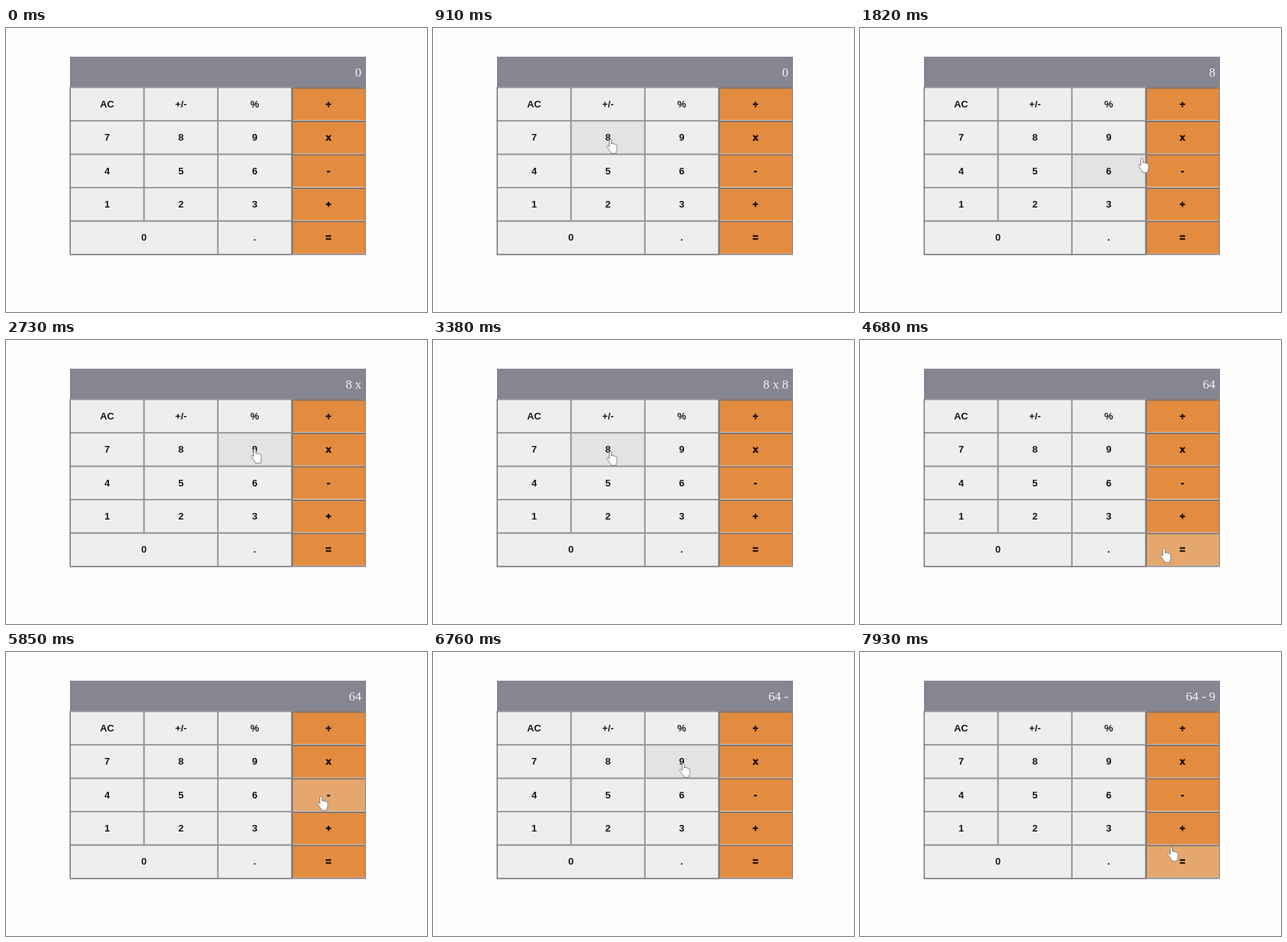
An HTML page that plays this animation: 572 by 386 pixels, repeating every 8 s.

```html
<!DOCTYPE html>
<html lang="en">
<head>
<meta charset="utf-8">
<title>Calculator</title>
<style>
html, body { margin: 0; width: 100%; height: 100%; overflow: hidden; background: #fefefe; }
svg { display: block; width: 572px; height: 386px; }
.key { font: bold 13.3px "Liberation Sans", Arial, sans-serif; text-anchor: middle; fill: #151515; }
.key.op { fill: #000; stroke: #000; stroke-width: .5px; }
#screen { font: 17.3px "Liberation Serif", Times, serif; text-anchor: end; fill: #f4f4f4; }
</style>
</head>
<body>
<svg viewBox="0 0 572 386">
  <rect x="87" y="39" width="402" height="42" fill="#868592"/>
  <text id="screen" x="483" y="66">0</text>
  <g id="faces"></g>
  <g id="edges" fill="none"></g>
  <g id="labels"></g>
  <path d="M87.5 39V308M488.5 39V308" stroke="#7d7d82"/>
  <path d="M87 307.7H489" stroke="#858585" stroke-width="1.6"/>
  <path id="hand" visibility="hidden" fill="#fff" stroke="#777" stroke-width=".9" stroke-linejoin="round"
    d="M4 2q0-1.6 1.5-1.6T7 2v5q.3-1 1.5-.9 1.2.1 1.3 1.2.4-.8 1.4-.6 1.1.2 1.1 1.4.5-.5 1.3-.2 1 .4.9 1.6V14q0 1.5-1 3v2.6H6.2V18Q4 15.5 2.5 13L.8 10.6q-.6-1.2.5-1.8 1.1-.4 2 .8L4 10.8Z"/>
</svg>
<script>
const LOOP = 8000, STEP = 130;
const LEFT = 87.2, TOP = 80.8, KEY_W = 100.3, KEY_H = 45.4;
const layout = ["AC +/- % ÷", "7 8 9 x", "4 5 6 -", "1 2 3 +", "0 0 . ="].map(r => r.split(" "));

const byId = id => document.getElementById(id);
const hand = byId("hand"), screenText = byId("screen");

function add(layer, tag, attrs, text) {
  const el = document.createElementNS("http://www.w3.org/2000/svg", tag);
  for (const name in attrs) el.setAttribute(name, attrs[name]);
  if (text) el.textContent = text;
  return byId(layer).appendChild(el);
}

function makeKey(label, row, col) {
  const x = LEFT + col * KEY_W, y = TOP + row * KEY_H;
  const w = label === "0" ? 2 * KEY_W : KEY_W, op = col === 3;
  const right = x + w, bottom = y + KEY_H;
  const box = { x, y, width: w, height: KEY_H };
  const edge = (d, stroke, width) => add("edges", "path", { d, stroke, "stroke-width": width });
  const face = add("faces", "rect", box);
  if (op) {
    edge(`M${x} ${bottom - .6}H${right}`, "#cfc8c2", 1.2);
    edge(`M${x + .8} ${bottom}V${y + .8}H${right}`, "#7c7670", 1.8);
  } else {
    add("edges", "rect", { ...box, stroke: "#999", "stroke-width": 1.8 });
  }
  const cx = x + w / 2, cy = y + KEY_H / 2;
  add("labels", "text", { class: op ? "key op" : "key", x: cx, y: cy + 4.2 }, label);
  return { label, face, x, y, right, bottom, cx, cy, colors: op ? ["#e38c40", "#e5a76d"] : ["#eee", "#e3e3e3"] };
}

const keys = layout.flatMap((labels, row) => labels
  .map((label, col) => labels.indexOf(label) === col && makeKey(label, row, col))
  .filter(Boolean));

// Each visit glides in, presses the key and leaves; bend pulls the way in off a straight line.
function visit(label, dx, { arrive, press, leave, bend = [0, 0], dy = 1 }) {
  const key = keys.find(k => k.label === label);
  return { label, x: key.cx + dx, y: key.cy + dy, arrive, press, leave, bend };
}
const visits = [
  visit("0", 65, { dy: 21, arrive: 130, leave: 130 }),
  visit("8", 3, { arrive: 910, press: 1300, leave: 1430 }),
  visit("x", -14, { arrive: 2080, press: 2340, leave: 2470, bend: [68, 55] }),
  visit("8", 3, { arrive: 2990, press: 3380, leave: 3640, bend: [12, -6] }),
  visit("=", -25, { dy: -3, arrive: 4290, press: 4550, leave: 4940, bend: [80, 33] }),
  visit("-", -10, { arrive: 5850, press: 6110, leave: 6240 }),
  visit("9", 2, { arrive: 6760, press: 7280, leave: 7670 }),
  visit("=", -15, { dy: -21, arrive: 7930, leave: LOOP })
];

function tipAt(t) {
  const i = visits.findLastIndex(v => v.arrive <= t);
  if (i < 0) return null;
  const a = visits[i], b = visits[i + 1];
  if (t <= a.leave || !b) return [a.x, a.y];
  const k = (t - a.leave) / (b.arrive - a.leave), pull = 2 * k * (1 - k);
  return [a.x + (b.x - a.x) * k + b.bend[0] * pull, a.y + (b.y - a.y) * k + b.bend[1] * pull];
}

const operators = {
  "x": (a, b) => a * b, "-": (a, b) => a - b, "+": (a, b) => a + b, "÷": (a, b) => a / b
};

function pressKey(text, label) {
  if (label in operators) return `${text} ${label}`;
  if (label === "=") {
    const [a, op, b] = text.split(" ");
    return String(operators[op](+a, +b));
  }
  if (text === "0") return label;
  return /\d$/.test(text) ? text + label : `${text} ${label}`;
}

function draw(now) {
  const t = Math.floor((now % LOOP) / STEP) * STEP;
  const tip = tipAt(t);
  hand.setAttribute("visibility", tip ? "visible" : "hidden");
  if (tip) hand.setAttribute("transform", `translate(${Math.round(tip[0]) - 5.5} ${Math.round(tip[1]) + .7})`);
  for (const k of keys) {
    const over = tip && tip[0] >= k.x && tip[0] < k.right && tip[1] >= k.y && tip[1] < k.bottom;
    k.face.setAttribute("fill", k.colors[over ? 1 : 0]);
  }
  screenText.textContent = visits.filter(v => v.press <= t).reduce((s, v) => pressKey(s, v.label), "0");
}

const start = performance.now();
function tick() {
  draw(performance.now() - start);
  requestAnimationFrame(tick);
}
tick();
</script>
</body>
</html>
```
